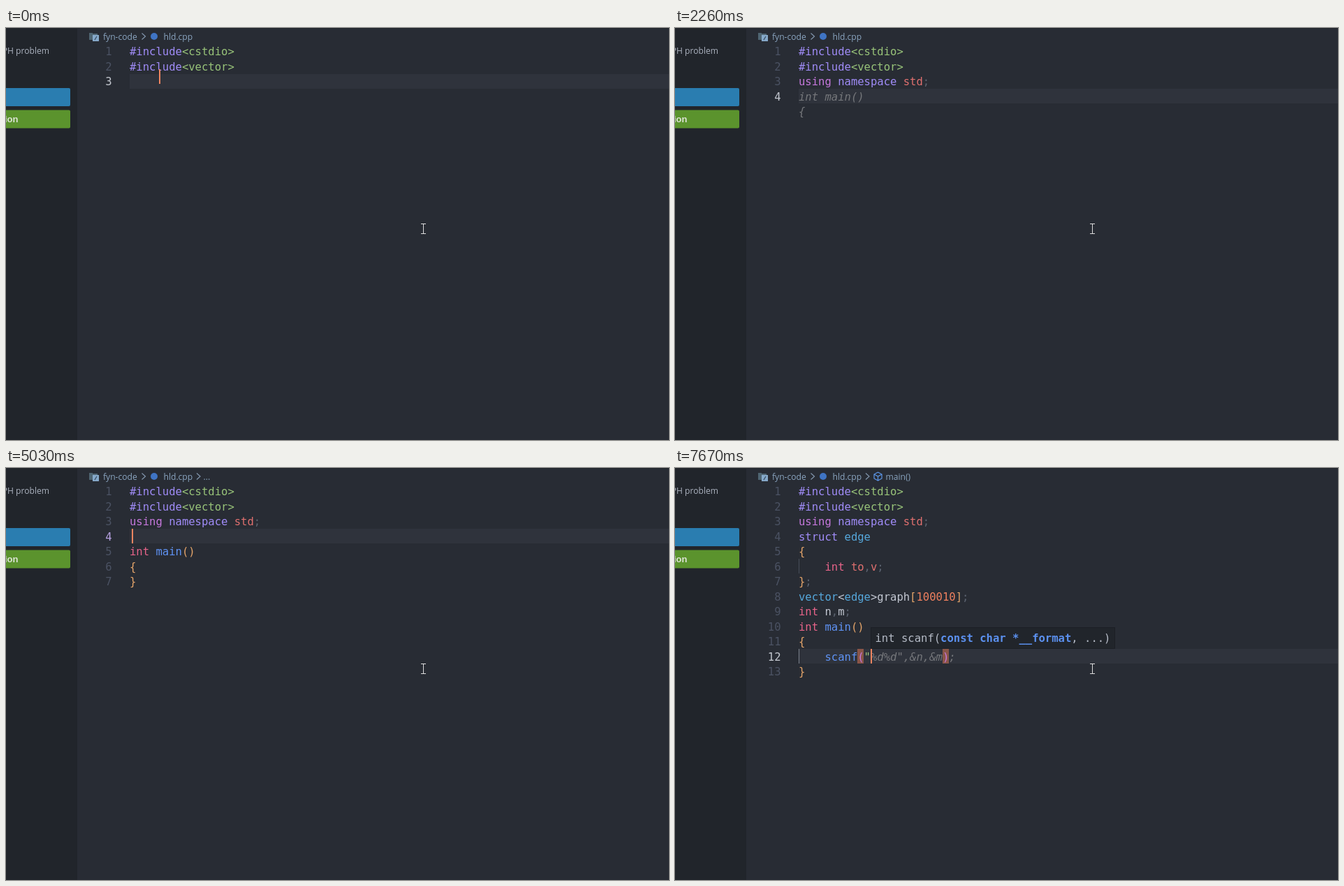
An HTML page with a canvas that plays this animation: 949 by 590 pixels, repeating every 8 s.

```html
<!DOCTYPE html>
<html>
<head>
<meta charset="utf-8">
<style>
html, body { margin: 0; width: 100%; height: 100%; overflow: hidden; background: #282c34; }
canvas { display: block; }
</style>
</head>
<body>
<canvas id="stage" width="949" height="590"></canvas>
<script>
const ctx = document.getElementById('stage').getContext('2d');
const LOOP = 8000, SLIDE = 80;
const X0 = 177, Y0 = 23, CW = 9.36, LH = 21.5;
const MONO = "15.55px 'DejaVu Sans Mono', 'Noto Sans Mono', monospace";
const UI = "'Open Sans', 'Noto Sans', sans-serif";
const SMALL = "11px 'Noto Sans', 'Noto Sans CJK SC', 'DejaVu Sans', sans-serif";

const INK = {
  v: '#a08cf8', g: '#98c379', p: '#c678dd', m: '#c862e0', r: '#e0706f', d: '#5c6370',
  i: '#e8648a', f: '#5f93f5', o: '#e5a56a', w: '#c3c8d2', e: '#56a8dc', n: '#f0805f', x: '#8b8078'
};
const GHOST = '#75777b', PANEL = '#21252b', EDGE = '#1c1f25';

// Each run of a line is a colour key followed by its text.
const HEAD = ['v#include|g<cstdio>', 'v#include|g<vector>'];
const STD = 'pusing|v namespace|r std|d;';
const MAIN = 'iint|f main|o()';
const BASE = [...HEAD, STD];
const STRUCT = ['vstruct|e edge', 'o{', 'i    int|r to|d,|rv|d;', 'o}|d;',
  'evector|w<|eedge|w>graph|o[|n100010|o]|d;', 'iint|w n|d,|wm|d;'];
const FULL = [...BASE, ...STRUCT, MAIN, 'o{'];
const scanLine = s => [...FULL, s, 'o}'];

const BODY = `    int n,m,k;
    scanf("%d%d%d",&n,&m,&k);
    vector<int> a(n);
    for(int i=0;i<n;i++)
        scanf("%d",&a[i]);
    int ans=0;
    for(int i=0;i<n;i++)
    {
        int cnt=0;
        for(int j=i+1;j<n;j++)
        {
            if(a[j]-a[i]>m)
                break;
            cnt++;
        }
        if(cnt>=k)
            ans++;
    }
    printf("%d\\n",ans);
    return 0;
}`.split('\n').map((s, i) => [6 + i, 0, s]);

// Suggestion kinds: s snippet, k keyword, f function, c constant.
const LIST_U = 'kusing sunion kunion kunsigned fungetc fungetwc funique funique_copy funinitialized_copy funinitialized_fill fupper_bound fuse_facet'.split(' ');
const LIST_S = 'sstruct kstruct fswap fswap_ranges sswitch kswitch fswprintf fswprintf_s fswscanf fswscanf_s ksynchronized cSEEK_CUR'.split(' ');
const LIST_SC = 'fscanf fscanf_s fsscanf fsscanf_s kstatic_cast sstruct kstruct fswscanf fswscanf_s ksynchronized cSEEK_CUR cSCHAR_MAX'.split(' ');

const popU = word => ({ row: 3, col: 0, word, items: LIST_U, doc: 'using' });
const popS = (word, items, doc) => ({ row: 12, col: 4, word, items, doc });
const pair = (a, b) => [[a, 0], [b, 0]];

// Every scene keeps what it does not change.
const scenes = [
  [0, { lines: [...HEAD, ''], ghost: [], marks: [], pop: null, hint: 0, crumb: '' }],
  [290, { lines: [...HEAD, 'wu'] }],
  [360, { pop: popU('u') }],
  [430, { lines: [...HEAD, 'wus'], pop: popU('us') }],
  [570, { lines: [...HEAD, 'wusi'], pop: popU('usi') }],
  [700, { lines: [...HEAD, 'wusin'], pop: popU('usin') }],
  [820, { lines: [...HEAD, 'pusing'], pop: popU('using') }],
  [960, { pop: null, ghost: [[3, 5, ' namespace std;']] }],
  [1320, { lines: [...HEAD, 'pusing|m namespace std;'], ghost: [] }],
  [1490, { lines: BASE }],
  [1690, { lines: [...BASE, ''] }],
  [2050, { ghost: [[4, 0, 'int main()'], [5, 0, '{']] }],
  [2550, { lines: [...BASE, MAIN, 'x{'], ghost: [] }],
  [2930, { ghost: BODY }],
  [3050, { lines: [...BASE, MAIN, 'o{', ''] }],
  [3660, { lines: [...BASE, MAIN, 'o{', 'o}'], ghost: [], marks: pair(5, 6) }],
  [3730, { crumb: 'main()' }],
  [4240, { marks: [] }],
  [4500, { crumb: '...' }],
  [4965, { lines: [...BASE, '', MAIN, 'o{', 'o}'] }],
  [6330, { lines: [...FULL, 'o}'], marks: pair(11, 12) }],
  [6400, { crumb: 'main()' }],
  [6660, { lines: scanLine(''), marks: pair(11, 13) }],
  [6870, { lines: scanLine('w    s') }],
  [6950, { pop: popS('s', LIST_S, 'struct') }],
  [7040, { lines: scanLine('w    sc'), pop: popS('sc', LIST_SC, '') }],
  [7350, { lines: scanLine('f    scanf|p(            )'), pop: null, hint: 10,
    marks: [[12, 9], [12, 22]], ghost: [[12, 10, '"%d%d",&n,&m'], [12, 23, ';']] }],
  [7600, { lines: scanLine('f    scanf|p(|g"           |p)'), hint: 11,
    ghost: [[12, 11, '%d%d",&n,&m'], [12, 23, ';']] }]
];
for (let i = 1; i < scenes.length; i++) scenes[i][1] = { ...scenes[i - 1][1], ...scenes[i][1] };

// Caret moves: start time, row, column.
const moves = [
  [-900, 2, 16], [-33, 3, 0], [274, 3, 1], [414, 3, 2], [554, 3, 3], [684, 3, 4], [804, 3, 5],
  [1304, 3, 20], [1680, 4, 0], [2540, 5, 1], [3040, 6, 4], [3290, 6, 0], [3650, 6, 1],
  [3997, 5, 1], [4228, 4, 1], [4445, 3, 1], [4670, 3, 20], [4965, 4, 0], [6150, 4, 0],
  [6320, 11, 1], [6648, 12, 4], [6858, 12, 5], [7028, 12, 6], [7335, 12, 10], [7584, 12, 11]
];

const last = (list, t) => list.findLastIndex(k => k[0] <= t);
const colX = c => X0 + c * CW;
const rowY = r => Y0 + (r - 1) * LH;

// cubic-bezier(.25, .1, .25, 1)
function ease(x) {
  if (x >= 1) return 1;
  let lo = 0, hi = 1, u = 0.5;
  const bez = (a, b) => 3 * (1 - u) ** 2 * u * a + 3 * (1 - u) * u * u * b + u ** 3;
  for (let i = 0; i < 18; i++) {
    u = (lo + hi) / 2;
    if (bez(0.25, 0.25) < x) lo = u; else hi = u;
  }
  return bez(0.1, 1);
}

function box(x, y, w, h, fill) {
  ctx.fillStyle = fill;
  ctx.fillRect(x, y, w, h);
}

// A block on the character grid, snapped to whole pixels.
function cell(r, c, w, fill) {
  box(Math.round(colX(c)), Math.floor(rowY(r)), Math.round(w), 21, fill);
}

function line(color, width, ...paths) {
  ctx.strokeStyle = color;
  ctx.lineWidth = width;
  ctx.beginPath();
  for (const p of paths)
    for (let i = 0; i < p.length; i += 2) ctx[i ? 'lineTo' : 'moveTo'](p[i], p[i + 1]);
  ctx.stroke();
}

function label(s, x, y, color, font, align = 'left') {
  ctx.font = font;
  ctx.fillStyle = color;
  ctx.textAlign = align;
  ctx.fillText(s, x, y);
}

// Monospaced text on the character grid.
function mono(s, x, y, color, style = '') {
  ctx.font = style + MONO;
  ctx.fillStyle = color;
  ctx.textAlign = 'left';
  [...s].forEach((ch, i) => { if (ch !== ' ') ctx.fillText(ch, x + i * CW, y); });
  return x + s.length * CW;
}

function cube(x, y, color) {
  line(color, 1.2, [x, y - 6, x + 5.5, y - 3, x + 5.5, y + 3, x, y + 6, x - 5.5, y + 3, x - 5.5, y - 3, x, y - 6],
    [x - 5.5, y - 3, x, y, x + 5.5, y - 3], [x, y, x, y + 6]);
}

function kindIcon(kind, x, y) {
  if (kind === 'f') return cube(x, y, '#5c97ea');
  if (kind === 's') {
    line('#a9abe6', 1.2, [x - 6, y + 6, x - 6, y - 6, x + 6, y - 6, x + 6, y + 6]);
    for (let i = -6; i < 6; i += 3) box(x + i, y + 5.5, 1.8, 1.2, '#a9abe6');
  } else if (kind === 'k') {
    const c = '#a596e6';
    line(c, 1.3, [x - 7, y - 4.5, x, y - 4.5], [x + 2, y - 4.5, x + 6, y - 4.5],
      [x - 7, y - 1, x - 3, y - 1], [x - 1, y - 1, x + 7, y - 1],
      [x - 7, y + 2, x + 1, y + 2], [x - 7, y + 5, x - 2, y + 5], [x, y + 5, x + 7, y + 5]);
  } else {
    const c = '#d98d84';
    ctx.strokeStyle = c;
    ctx.lineWidth = 1.2;
    ctx.strokeRect(x - 6.5, y - 4.5, 13, 9);
    line(c, 1, [x - 3.5, y - 1.5, x + 3.5, y - 1.5], [x - 3.5, y + 1.5, x + 3.5, y + 1.5]);
  }
}

function chevron(x) {
  line('#8296ad', 1.2, [x, 7.5, x + 5, 12, x, 16.5]);
}

function button(y, fill) {
  ctx.beginPath();
  ctx.roundRect(-5, y, 97, 26, 2);
  ctx.fillStyle = fill;
  ctx.fill();
}

function sidebar() {
  box(0, 0, 102, 590, PANEL);
  box(0, 0, 949, 1, PANEL);
  label('CPH problem', 62, 37, '#abb2bf', '12.1px ' + UI, 'right');
  button(86, '#2a7db0');
  button(117.5, '#5b932d');
  label('ion', 17.5, 135, '#dde3d6', "bold 13px 'Liberation Sans', sans-serif", 'right');
}

function breadcrumb(crumb) {
  const c = '#8aa5c0', font = '12.1px ' + UI;
  box(119, 7, 5, 2, '#4f6572');
  box(119, 8, 12, 9, '#4f6572');
  box(124, 10, 9, 9, '#86a9ca');
  line('#31465c', 1.2, [127, 17, 130, 12]);
  label('fyn-code', 139, 16.5, c, font);
  chevron(194.5);
  ctx.beginPath();
  ctx.arc(212, 12, 5, 0, 7);
  ctx.fillStyle = '#3f74c4';
  ctx.fill();
  label('hld.cpp', 225.5, 16.5, c, font);
  if (!crumb) return;
  chevron(273);
  if (crumb === '...') return label(crumb, 282.5, 16.5, c, font);
  cube(290.5, 12, '#5c97ea');
  label(crumb, 301.5, 16.5, c, font);
}

function code(s, row, frozen) {
  cell(row, 0, 949 - X0, '#2f333c');
  for (const [r, c] of s.marks) cell(r, c, CW, '#8a5548');
  if (s.lines.length > 10) {
    cell(6, 0, 1, '#484e5a');
    if (s.lines.length > 12) cell(12, 0, 1, '#7a808c');
  }
  s.lines.forEach((text, i) => {
    const y = rowY(i + 1) + 16, num = String(i + 1);
    const active = frozen ? '#b7a2e2' : '#c3c7cf';
    mono(num, 151.5 - num.length * CW, y, i + 1 === row ? active : '#4b5263');
    let x = X0;
    if (text) for (const run of text.split('|')) x = mono(run.slice(1), x, y, INK[run[0]]);
  });
  for (const [r, c, text] of s.ghost) {
    const y = rowY(r) + 16, at = text.indexOf('>=');
    mono(text.replace('>=', '  '), colX(c), y, GHOST, 'italic ');
    if (at >= 0) label('⩾', colX(c + at + 1), y, GHOST, "18px 'DejaVu Sans', sans-serif", 'center');
  }
}

// Indexes of the typed letters inside a name, or null.
function match(name, word) {
  const hits = [];
  let from = 0;
  for (const ch of word) {
    const i = name.toLowerCase().indexOf(ch, from);
    if (i < 0) return null;
    hits.push(i);
    from = i + 1;
  }
  return hits;
}

function frame(x, y, w, h) {
  box(x, y, w, h, EDGE);
  box(x + 1, y + 1, w - 2, h - 2, PANEL);
}

// Draws the suggestion list and returns its bottom edge.
function popup({ row, col, word, items, doc }) {
  const x = Math.round(colX(col + 1)), y = Math.floor(rowY(row + 1)), W = 422;
  const shown = items.filter(it => match(it.slice(1), word));
  const h = shown.length * LH, end = y + h + 24;
  frame(x, y, W, h + 24);
  frame(x + W, y - 1, 960, 45);
  mono(doc ? 'Code snippet for ' + doc : 'int scanf(const char *__fo', x + W + 5, y + 21, '#7d828c');
  shown.forEach((it, i) => {
    const name = it.slice(1), top = y + i * LH, hits = match(name, word);
    if (!i) box(x + 1, top + 1, W - 2, LH, '#394f80');
    kindIcon(it[0], x + 10.5, top + 11.5);
    [...name].forEach((ch, k) => {
      const hit = hits.includes(k);
      mono(ch, x + 22.5 + k * CW, top + 17, hit ? '#4f8df5' : i ? '#abb2bf' : '#d0d5de', hit ? 'bold ' : '');
    });
  });
  box(x + 1, y + h + 2, W - 2, 1, '#33373f');
  label('替换 (⏎),  插入 (Shift+⏎)', x + 7, end - 7, '#6f757f', SMALL);
  label('显示更多 (Ctrl+Space)', x + W - 8, end - 7, '#6f757f', SMALL, 'right');
  return end;
}

function signature(col) {
  const x = Math.round(colX(col));
  frame(x, 228, 350, 31);
  let at = mono('int scanf(', x + 6.5, 249, '#b6bcc7');
  at = mono('const char *__format', at, 249, '#5b90ee', 'bold ');
  mono(', ...)', at, 249, '#b6bcc7');
}

function caret(t, i) {
  const [start, r, c] = moves[i], [, pr, pc] = moves[Math.max(0, i - 1)];
  const bar = (x, y, a) => {
    ctx.globalAlpha = a;
    box(Math.round(x), Math.floor(y), 2, 21, '#ee8560');
    ctx.globalAlpha = 1;
  };
  // Slow dissolve between two caret positions.
  if (t >= 5030 && t < 6150) {
    const f = (t - 5030) / 1120;
    bar(X0 + 3, rowY(4), 1 - f);
    return bar(X0, rowY(4), f);
  }
  const rest = t - start - SLIDE;
  if (rest > 0 && rest % 1000 >= 500) return;
  const e = ease((t - start) / SLIDE);
  bar(colX(pc + (c - pc) * e), rowY(pr + (r - pr) * e), 1);
}

function mouse(hand) {
  if (!hand) {
    return line('#dcdcdc', 1, [594, 280.5, 601, 280.5], [597.5, 281, 597.5, 294], [594, 294.5, 601, 294.5]);
  }
  const p = new Path2D('M595 288.5q1.8-2 3.2 0v6l2 .2q1.2-.6 2 .6 1.4-.5 2 .7 1.6-.2 1.7 1.5v5l-1.8 4.5h-7.5l-5-7.5q.4-2.2 3.4.3z');
  ctx.lineWidth = 2;
  ctx.strokeStyle = '#15171b';
  ctx.stroke(p);
  ctx.fillStyle = '#fff';
  ctx.fill(p);
}

function draw(t) {
  const s = scenes[last(scenes, t)][1], i = last(moves, t);
  box(0, 0, 949, 590, '#282c34');
  sidebar();
  breadcrumb(s.crumb);
  code(s, Math.min(moves[i][1], s.lines.length), t >= 5030 && t < 6330);
  caret(t, i);
  const bottom = s.pop ? popup(s.pop) : 0;
  if (s.hint) signature(s.hint);
  mouse(bottom > 287);
}

const begin = performance.now();
function tick() {
  draw((performance.now() - begin) % LOOP);
  requestAnimationFrame(tick);
}
tick();
</script>
</body>
</html>
```
